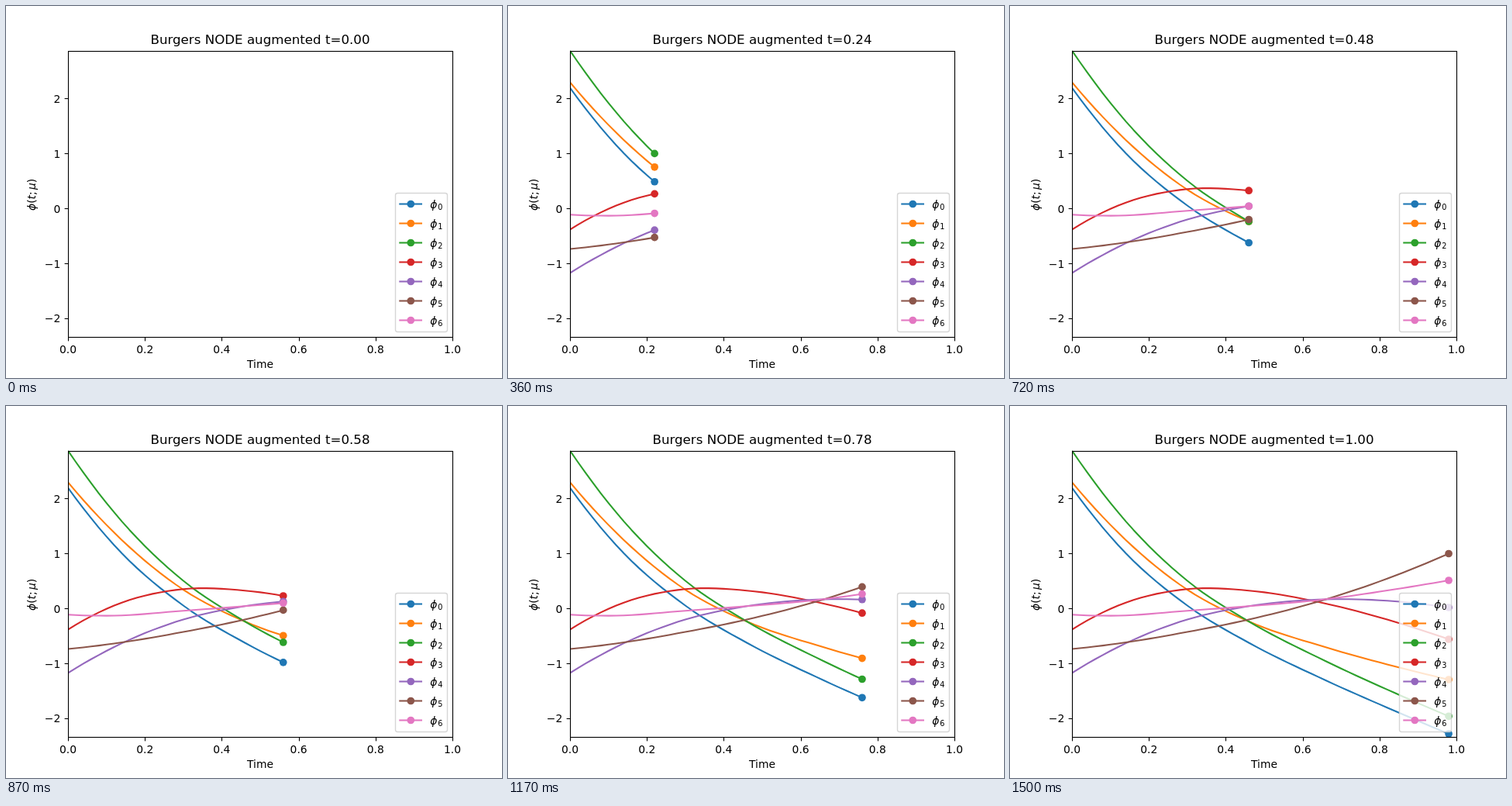
An HTML page with a canvas for the animation above (1530 ms loop, 640x480 px).

```html
<!DOCTYPE html>
<html lang="en">
<head>
<meta charset="utf-8">
<style>
  html, body { margin: 0; width: 100%; height: 100%; overflow: hidden; background: #fff; }
  canvas { display: block; }
</style>
</head>
<body>
<canvas id="plot" width="640" height="480"></canvas>
<script>
const ctx = document.getElementById('plot').getContext('2d');
const STEP_MS = 30, STEPS = 51, DT = 0.02;
const LEFT = 80, TOP = 57.6, WIDTH = 496, HEIGHT = 369.6;

// Each curve is given by its pixel height at these knot times.
const knots = [0, 0.12, 0.3, 0.46, 0.66, 0.84, 0.98];
const curves = [
  { color: '#1f77b4', y: [105.5, 179.5, 257.5, 305.5, 354, 393.5, 423] },
  { color: '#ff7f0e', y: [98.5, 163.3, 237, 278, 311.3, 336, 353] },
  { color: '#2ca02c', y: [57.6, 137.2, 225.5, 278, 329.2, 370.3, 400.3] },
  { color: '#d62728', y: [288.5, 257.5, 236.3, 238.2, 255, 278.5, 301] },
  { color: '#9467bd', y: [344.5, 311, 275.5, 258.3, 249.5, 252, 260] },
  { color: '#8c564b', y: [313.5, 306.5, 291.5, 275.5, 249.5, 219, 190.5] },
  { color: '#e377c2', y: [269.3, 270.5, 264.2, 258.3, 249.3, 236.5, 225] }
];

const toX = t => LEFT + WIDTH * t;

function parabola(y, mid, t) {
  const i = Math.min(Math.max(mid, 1), knots.length - 2);
  const [a, b, c] = knots.slice(i - 1, i + 2);
  const s1 = (y[i] - y[i - 1]) / (b - a);
  const s2 = (y[i + 1] - y[i]) / (c - b);
  return y[i - 1] + (t - a) * (s1 + (t - b) * (s2 - s1) / (c - a));
}

// Smooth curve: blend the parabolas around both ends of the segment.
function heightAt(y, t) {
  let i = 0;
  while (i < knots.length - 2 && t > knots[i + 1]) i++;
  const u = (t - knots[i]) / (knots[i + 1] - knots[i]);
  return (1 - u) * parabola(y, i, t) + u * parabola(y, i + 1, t);
}

function text(str, x, y, { size = 13.89, align = 'center', style = '' } = {}) {
  ctx.font = `${style} ${size}px "DejaVu Sans", sans-serif`;
  ctx.textAlign = align;
  ctx.fillStyle = '#000';
  ctx.fillText(str, x, y);
  return ctx.measureText(str).width;
}

function line(points, color, width) {
  ctx.beginPath();
  points.forEach(([x, y]) => ctx.lineTo(x, y));
  ctx.strokeStyle = color;
  ctx.lineWidth = width;
  ctx.lineCap = width > 2 ? 'square' : 'butt';
  ctx.lineJoin = 'round';
  ctx.stroke();
}

function marker(x, y, color) {
  ctx.beginPath();
  ctx.arc(x, y, 4.86, 0, Math.PI * 2);
  ctx.fillStyle = color;
  ctx.fill();
}

function drawCurves(count) {
  ctx.save();
  ctx.beginPath();
  ctx.rect(LEFT, TOP, WIDTH, HEIGHT);
  ctx.clip();
  for (const { color, y } of curves) {
    const points = Array.from({ length: count }, (_, i) => [toX(i * DT), heightAt(y, i * DT)]);
    line(points, color, 2.08);
    marker(...points[count - 1], color);
  }
  ctx.restore();
}

function drawAxes() {
  for (let i = 0; i <= 5; i++) {
    const x = Math.round(toX(i / 5)) + 0.5;
    line([[x, 428], [x, 432.4]], '#000', 1.11);
    text((i / 5).toFixed(1), toX(i / 5), 448);
  }
  for (let v = -2; v <= 2; v++) {
    const y = 261.5 - 70.8 * v;
    const snapped = Math.floor(y) + 0.5;
    line([[75.6, snapped], [80, snapped]], '#000', 1.11);
    text(String(v).replace('-', '\u2212'), 70.3, y + 5.2, { align: 'right' });
  }
  ctx.strokeStyle = '#000';
  ctx.lineWidth = 1.11;
  ctx.lineJoin = 'miter';
  ctx.strokeRect(80.5, 58.5, 496, 369);
  text('Time', 328, 467);

  ctx.save();
  ctx.translate(38, 264);
  ctx.rotate(-Math.PI / 2);
  let x = 0;
  for (const ch of 'ϕ(t;μ)') {
    const style = /[ϕtμ]/.test(ch) ? 'italic' : '';
    x += text(ch, x, 0, { align: 'left', style }) + (ch === ';' ? 2.3 : 0);
  }
  ctx.restore();
}

function drawLegend() {
  ctx.beginPath();
  ctx.roundRect(502.5, 241.5, 67, 179, 2.8);
  ctx.fillStyle = 'rgba(255, 255, 255, 0.8)';
  ctx.fill();
  ctx.strokeStyle = 'rgba(204, 204, 204, 0.8)';
  ctx.lineWidth = 1.39;
  ctx.stroke();
  curves.forEach(({ color }, i) => {
    const y = 255.5 + 25 * i;
    line([[508.3, y], [536, y]], color, 2.08);
    marker(522.3, y, color);
    text('ϕ', 547.3, y + 5, { align: 'left', style: 'italic' });
    text(i, 557.2, y + 7, { align: 'left', size: 9.72 });
  });
}

function draw(now) {
  const step = Math.floor(now / STEP_MS) % STEPS;
  ctx.fillStyle = '#fff';
  ctx.fillRect(0, 0, 640, 480);
  if (step > 0) drawCurves(step);
  drawAxes();
  drawLegend();
  text(`Burgers NODE augmented t=${(step * DT).toFixed(2)}`, 328, 49, { size: 16.67 });
}

const start = performance.now();
function tick() {
  draw(performance.now() - start);
  requestAnimationFrame(tick);
}
tick();
</script>
</body>
</html>
```
